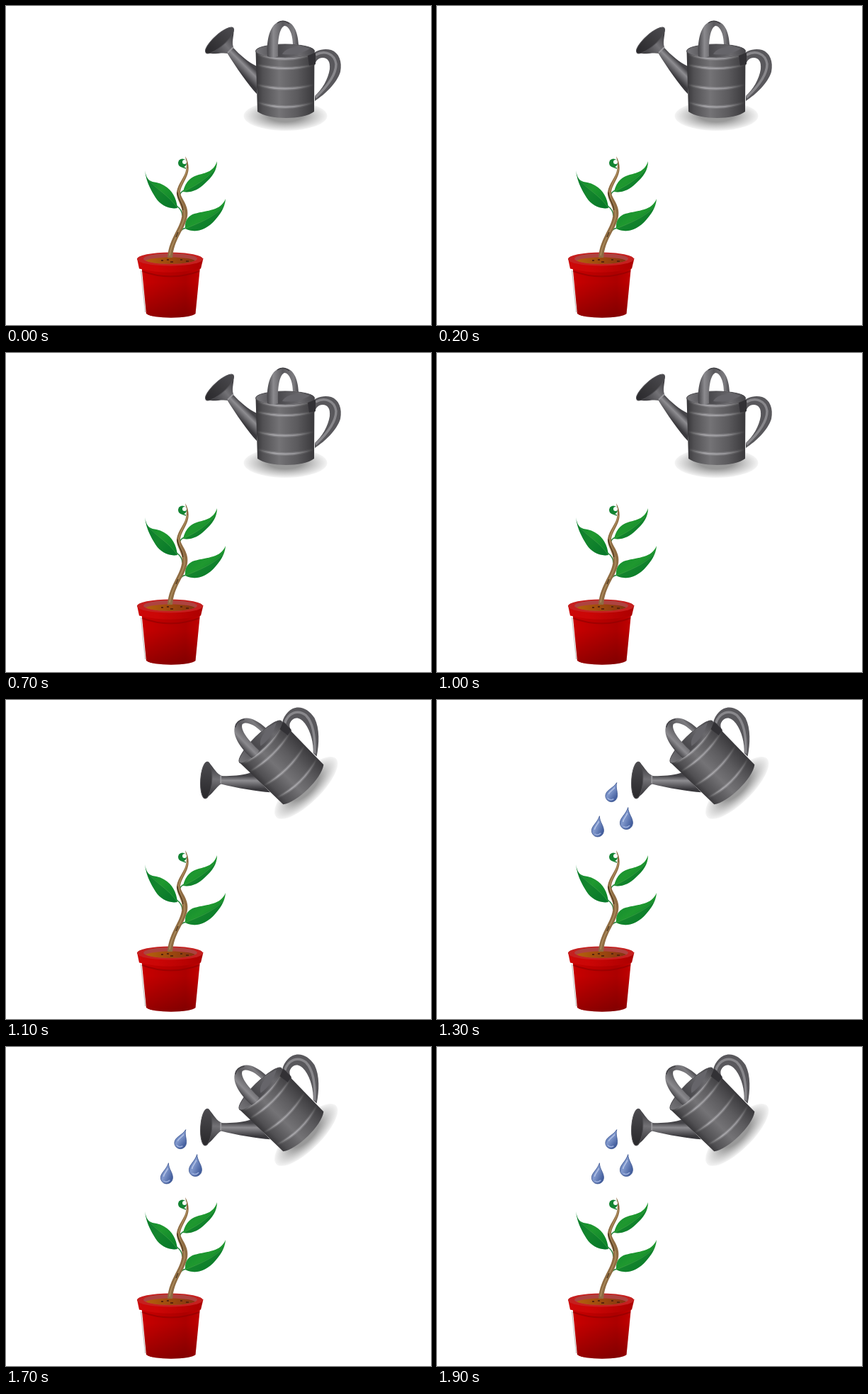
Write an HTML page that moves like this. It is 600 by 450 pixels and loops after 2 s.

```html
<!DOCTYPE html>
<html lang="en">
<head>
<meta charset="utf-8">
<title>Watering a plant</title>
<style>
  html, body { margin: 0; width: 100%; height: 100%; overflow: hidden; background: #fff; }
  svg { display: block; width: 100%; height: 100%; }
</style>
</head>
<body>
<svg viewBox="0 0 600 450">
  <defs>
    <linearGradient id="metal">
      <stop offset="0" stop-color="#353437"/><stop offset=".12" stop-color="#515053"/>
      <stop offset=".4" stop-color="#747376"/><stop offset=".7" stop-color="#5c5b5e"/>
      <stop offset="1" stop-color="#39383b"/>
    </linearGradient>
    <linearGradient id="inside">
      <stop offset="0" stop-color="#77767a"/><stop offset=".4" stop-color="#4a494d"/>
      <stop offset=".75" stop-color="#6a696d"/><stop offset="1" stop-color="#454448"/>
    </linearGradient>
    <linearGradient id="band">
      <stop offset="0" stop-color="#aaa" stop-opacity="0"/><stop offset=".3" stop-color="#b5b4b8"/>
      <stop offset=".65" stop-color="#a5a4a8"/><stop offset="1" stop-color="#888" stop-opacity="0"/>
    </linearGradient>
    <linearGradient id="strap">
      <stop offset="0" stop-color="#454448"/><stop offset=".2" stop-color="#8b8a8e"/>
      <stop offset=".5" stop-color="#59585c"/><stop offset=".85" stop-color="#7d7c80"/>
      <stop offset="1" stop-color="#4a494d"/>
    </linearGradient>
    <linearGradient id="spout" gradientUnits="userSpaceOnUse" x1="343" y1="81" x2="330" y2="94">
      <stop offset="0" stop-color="#454448"/><stop offset=".35" stop-color="#8e8d91"/>
      <stop offset="1" stop-color="#3a393d"/>
    </linearGradient>
    <linearGradient id="cone" gradientUnits="userSpaceOnUse" x1="290" y1="68" x2="323" y2="40">
      <stop offset="0" stop-color="#353438"/><stop offset=".55" stop-color="#737276"/>
      <stop offset="1" stop-color="#3c3b3f"/>
    </linearGradient>
    <linearGradient id="face">
      <stop offset="0" stop-color="#29282b"/><stop offset="1" stop-color="#4c4b4f"/>
    </linearGradient>
    <radialGradient id="shadow">
      <stop offset=".4" stop-color="#999"/><stop offset=".7" stop-color="#cacaca"/>
      <stop offset="1" stop-color="#f5f5f5"/>
    </radialGradient>
    <linearGradient id="pot">
      <stop offset="0" stop-color="#c80000"/><stop offset=".3" stop-color="#bc0000"/>
      <stop offset=".75" stop-color="#ac0000"/><stop offset="1" stop-color="#c00000"/>
    </linearGradient>
    <linearGradient id="dusk" x2="0" y2="1">
      <stop offset=".3" stop-opacity="0"/><stop offset="1" stop-opacity=".25"/>
    </linearGradient>
    <linearGradient id="rim">
      <stop offset="0" stop-color="#cc0808"/><stop offset=".3" stop-color="#cc0606"/>
      <stop offset="1" stop-color="#ac0000"/>
    </linearGradient>
    <linearGradient id="soil">
      <stop offset="0" stop-color="#b5600c"/><stop offset="1" stop-color="#843310"/>
    </linearGradient>
    <linearGradient id="leaf" x2="1" y2="1">
      <stop offset="0" stop-color="#0c8630"/><stop offset=".5" stop-color="#1f982f"/>
      <stop offset="1" stop-color="#088029"/>
    </linearGradient>
    <linearGradient id="water" x2="1" y2=".5">
      <stop offset="0" stop-color="#4767a8"/><stop offset=".45" stop-color="#8299cd"/>
      <stop offset="1" stop-color="#45609f"/>
    </linearGradient>
    <path id="drop" d="M0-21C1-12 9-7 9 1A9 9 0 0 1-9 1C-9-6-2-11 0-21Z"/>
    <path id="potBody" d="M191.500 368L198 434C206 441.500 260 441.500 267.500 434L274 368Z"/>
    <g id="droplet">
      <use href="#drop" fill="url(#water)" stroke="#3d5590" stroke-width=".8"/>
      <path d="M-5 0C-5-5-1-8 0-13" fill="none" stroke="#b3c2e5" stroke-width="1.6"/>
      <path d="M-4 6Q1 9 5 4" fill="none" stroke="#9fb2df" stroke-width="1.5"/>
    </g>
    <g id="bands" fill="none">
      <path d="M354 68Q394 81 435 68"/><path d="M354 83Q394 93 435 83"/>
      <path d="M354 111Q394 122 435 111"/><path d="M355 136Q394 149 435 136"/>
    </g>
  </defs>

  <g id="can">
    <ellipse cx="394.500" cy="155" rx="59" ry="21" fill="url(#shadow)"/>
    <path d="M312 66L320 58C330 69 343 80 354 85V124C342 111 325 87 312 66Z" fill="url(#spout)"/>
    <path d="M282 66L321 31C323 40 318 49 321 58L313 67C304 65 294 69 282 66Z" fill="url(#cone)"/>
    <ellipse cx="301.500" cy="48.500" rx="26" ry="8" transform="rotate(-42 301.5 48.5)"
      fill="url(#face)" stroke="#504f53"/>
    <path d="M313 66L321 58" stroke="#99989c" stroke-width="2"/>
    <path d="M428 72C436 62 449 59 459 62C470 66 475 78 472 93C467 109 451 124 436 134V127C446 118 455 103 457 89C458 78 454 73 447 73C441 73 437 77 436 84Z" fill="#59585c"/>
    <path d="M437 69C450 62 464 67 466 82C466 98 453 114 437 129" fill="none" stroke="#88878b" stroke-width="3.500"/>
    <path d="M352.500 63Q394 83 435.500 63L435 149C420 161 371 161 355 149Z" fill="url(#metal)"/>
    <ellipse cx="394" cy="63.500" rx="41.500" ry="9.500" fill="url(#inside)" stroke="#49484c"/>
    <path d="M390 68C394 59 411 55 429 60C418 67 404 70 390 68Z" fill="#66656a"/>
    <g stroke="url(#band)">
      <use href="#bands" stroke-width="4.500" opacity=".35"/>
      <use href="#bands" stroke-width="1.800" opacity=".75"/>
    </g>
    <path d="M426 70L437 66V82L428 84Z" fill="#323135"/>
    <path d="M369 71C367 45 374 21 391 21C406 21 412 36 413 55L405 54C405 41 400 28 393 28C386 31 383 48 384 71Q376 74 369 71Z" fill="url(#strap)"/>
    <path d="M383 24Q391 18 400 25" fill="none" stroke="#444347" stroke-width="1.500"/>
  </g>

  <g id="plant">
    <use href="#potBody" fill="url(#pot)"/>
    <use href="#potBody" fill="url(#dusk)"/>
    <path d="M192 374Q232 389 273 374" fill="none" stroke="#8c0000" stroke-width="2" opacity=".6"/>
    <path d="M190.500 373L196.500 432" stroke="#a39a96" stroke-width=".7"/>
    <path d="M185 356L188 370.500Q232 381 275 370.500L278.500 356Z" fill="url(#rim)"/>
    <ellipse cx="231.500" cy="357" rx="46.500" ry="9.500" fill="#c5201f"/>
    <ellipse cx="232" cy="356.500" rx="38" ry="7.500" fill="#ad4340"/>
    <path d="M197 359C211 353 254 353 267 359C258 365 210 366 197 359Z" fill="url(#soil)"/>
    <path d="M219 359h3M232 361h4M246 358h3M254 360h4M227 358h3" stroke="#59230c" stroke-width="2"/>
    <g fill="none" stroke="#23823a" stroke-width="1.500">
      <path d="M241 282Q249 288 249 296M253 260Q247 261 245 267M254 313Q245 315 242 325M254 229Q251 228 247 226"/>
    </g>
    <path d="M228 355C229 340 234 330 240 318C247 305 250 295 248 286C245 276 240 270 241 262C243 250 252 242 254 232C256 224 254 217 253 212C258 220 259 230 256 238C253 247 247 254 246 262C246 270 254 276 256 288C258 300 251 312 246 321C240 332 236 342 235 355Z" fill="#8f6c43"/>
    <path d="M231 352C233 332 248 316 252 298C254 283 243 274 244 262C246 249 255 241 256 229" fill="none" stroke="#b0905f" stroke-width="1.300"/>
    <path d="M242 263C242 272 250 279 250 288M240 326L243 319" fill="none" stroke="#4b351f" stroke-width="1.300"/>
    <circle cx="249" cy="221.500" r="6" fill="#128332"/>
    <circle cx="252" cy="220" r="3" fill="#fff"/>
    <g fill="url(#leaf)">
      <path d="M196 232C198 241 200 246 207 248C225 250 240 262 242 285C230 287 218 281 211 270C205 260 198 249 196 232Z"/>
      <path d="M298 219C298 232 291 241 281 250C271 260 260 264 250 262C253 248 261 241 272 238C284 235 293 233 298 219Z"/>
      <path d="M310 272C309 285 302 294 295 302C283 316 267 321 253 314C252 303 257 296 266 293C285 288 303 289 310 272Z"/>
    </g>
    <g fill="#00642a" opacity=".35">
      <path d="M198 241C211 257 229 266 242 285C230 287 218 281 211 270Q202 257 198 241Z"/>
      <path d="M296 228C293 239 285 246 281 250C271 260 260 264 250 262C267 254 284 243 296 228Z"/>
      <path d="M308 281C304 292 299 297 295 302C283 316 267 321 253 314C273 306 293 297 308 281Z"/>
    </g>
    <g fill="none" stroke="#55ad52" stroke-width=".8" opacity=".6">
      <path d="M200 244C211 258 229 266 242 285M250 262C267 254 283 244 294 231M253 314C273 306 293 298 306 284"/>
    </g>
  </g>

  <g id="drops">
    <use href="#droplet" transform="translate(246.500 134.500) rotate(22) scale(.92)"/>
    <use href="#droplet" transform="translate(227 183.500) rotate(7) scale(.95)"/>
    <use href="#droplet" transform="translate(267.500 172.500) rotate(6)"/>
  </g>
</svg>
<script>
  const LOOP = 2000, TILT_AT = 1100, DROPS_AT = 1300;
  const can = document.getElementById("can");
  const drops = document.getElementById("drops");
  // Pivot is the lower left corner of the can.
  const tilted = "translate(392 148) rotate(-44.5) translate(-355 -150)";
  const start = performance.now();

  function draw() {
    const time = (performance.now() - start) % LOOP;
    can.setAttribute("transform", time >= TILT_AT ? tilted : "");
    drops.setAttribute("visibility", time >= DROPS_AT ? "visible" : "hidden");
    requestAnimationFrame(draw);
  }
  draw();
</script>
</body>
</html>
```
